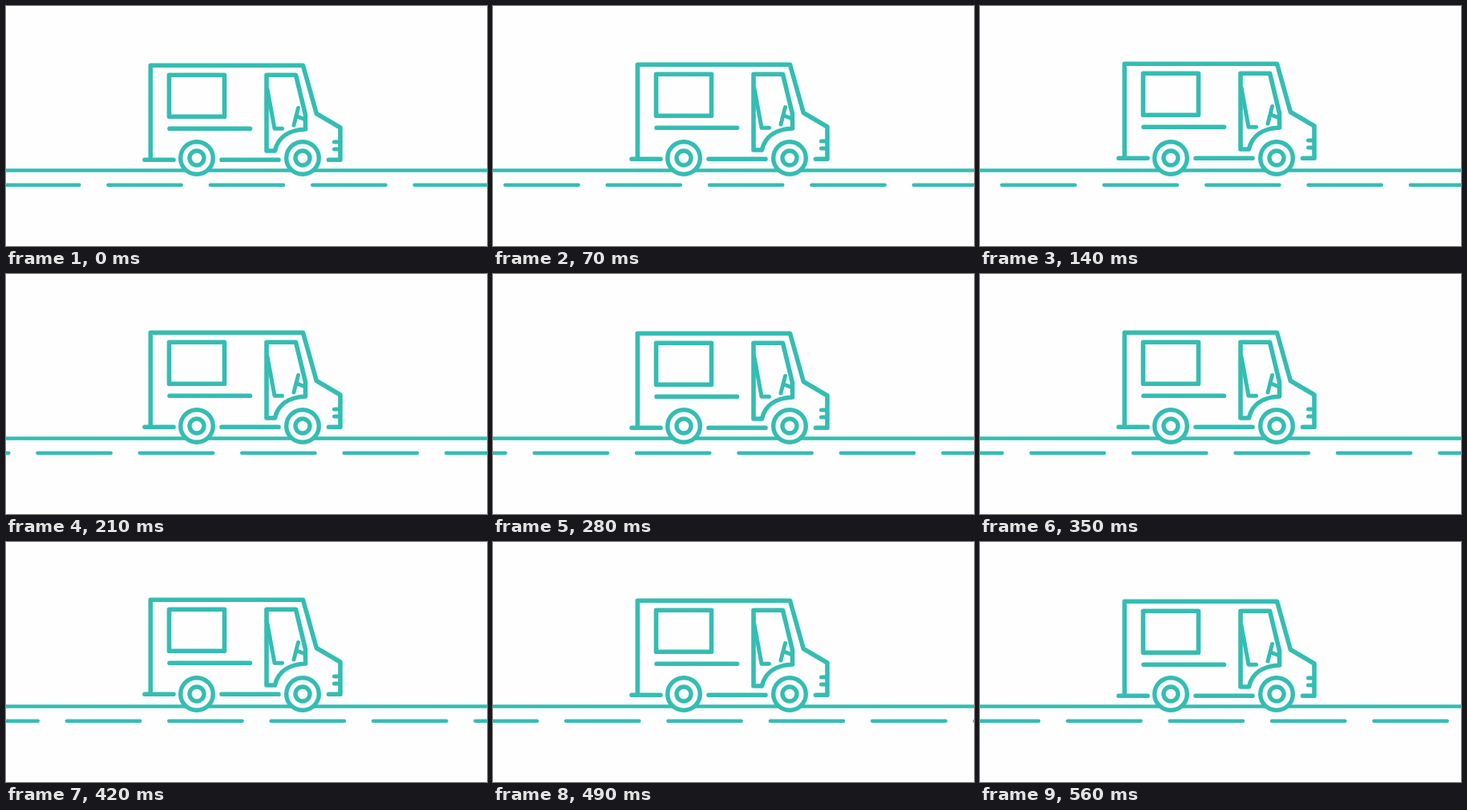
Recreate the animation shown at these times as an HTML page. Size 600 by 300 pixels, loop 0.63 s.

```html
<!DOCTYPE html>
<html lang="en">
<head>
<meta charset="utf-8">
<title>Van on the road</title>
<style>
  html, body { margin: 0; width: 100%; height: 100%; overflow: hidden; background: #fefefe; }
  svg { display: block; width: 100%; height: 100%; }
  .ink { fill: none; stroke: #34bdb3; stroke-linecap: round; stroke-linejoin: round; }
</style>
</head>
<body>
<svg viewBox="0 0 600 300">
  <g class="ink" stroke-width="4.4">
    <path d="M-5 205.5H605"/>
    <path id="dashes" d="M-127.4 223.8H740" stroke-dasharray="91.4 36"/>
  </g>
  <g id="van" class="ink" stroke-width="5.6">
    <path d="M173 192.3H209M180.3 192V74.3H370.5L387.3 134.5L417 152V192.3H402.5M269 192.3H340"/>
    <path d="M203.5 86.2H272.5V138.2H203.5ZM204 153.3H304.5"/>
    <path d="M325 86.2H361.5L373.5 136V154C353 155 339 164 335.5 181H325Z"/>
    <path d="M326 104L335 153.3H344.5M364.5 127.5L359 149M363 138L372 141.5" stroke-width="5"/>
    <path d="M409.5 170H416M409.5 179H416" stroke-width="5"/>
  </g>
  <g class="ink" stroke-width="5.4">
    <circle cx="238" cy="190" r="20.3" fill="#fefefe"/>
    <circle cx="238" cy="190" r="9"/>
    <circle cx="370" cy="190" r="20.3" fill="#fefefe"/>
    <circle cx="370" cy="190" r="9"/>
  </g>
</svg>
<script>
  const STEP = 70, STEPS = 9, PERIOD = 127.4;
  // Share of one dash period covered at each step: slow in the middle, quicker at the ends.
  const travel = [0, 2.5, 4.5, 6.5, 8.5, 10.5, 12.5, 15, 18].map(n => n / 21);
  const dashes = document.getElementById("dashes");
  const van = document.getElementById("van");
  const start = performance.now();

  function draw() {
    const elapsed = Math.max(0, performance.now() - start);
    const step = Math.floor(elapsed / STEP) % STEPS;
    const bob = Math.abs(step % 4 - 2) - 2;
    dashes.setAttribute("transform", `translate(${PERIOD * travel[step]} 0)`);
    van.setAttribute("transform", `translate(0 ${bob})`);
    requestAnimationFrame(draw);
  }
  draw();
</script>
</body>
</html>
```
